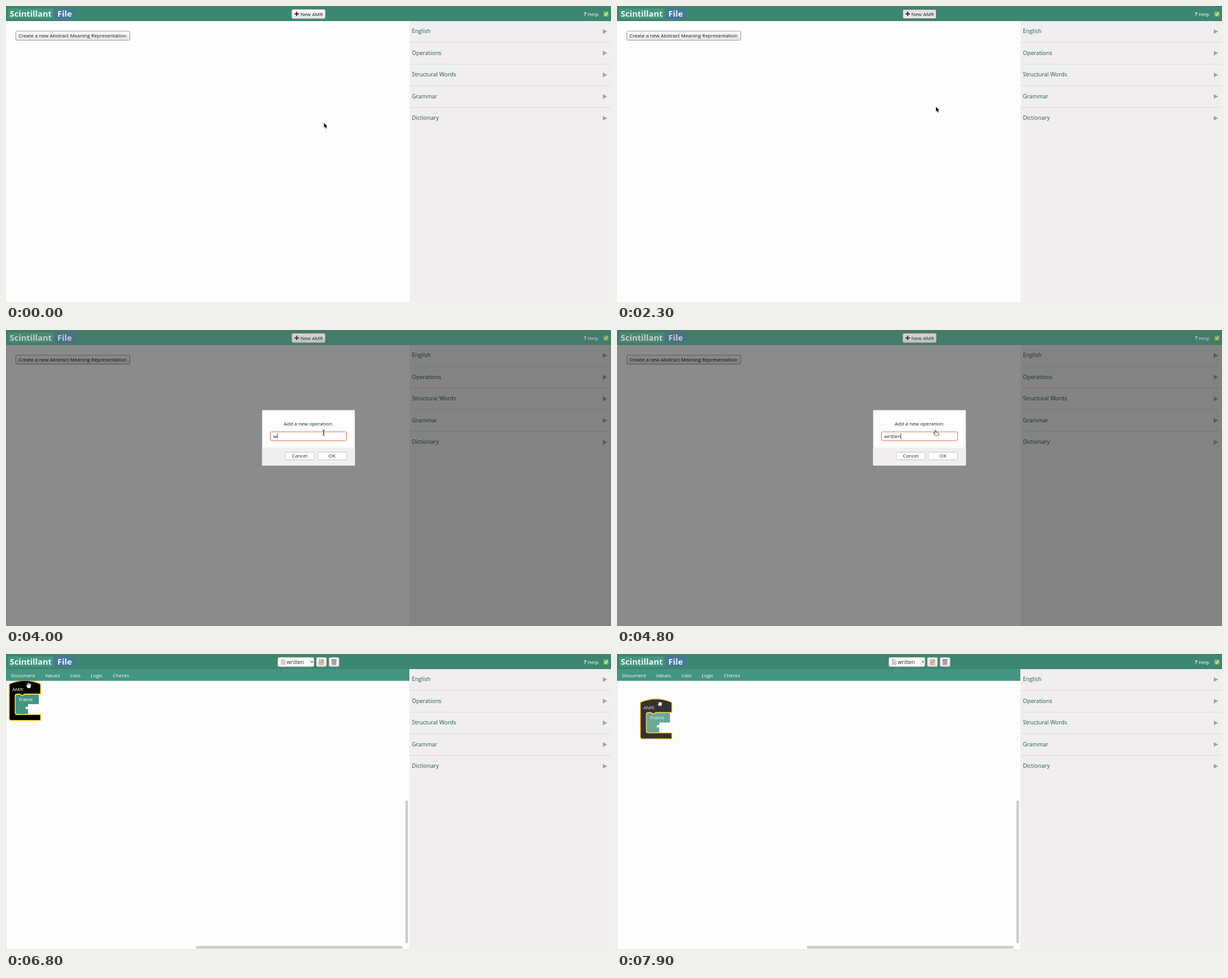
Recreate the animation shown at these times as an HTML page with a canvas. Size 960 px wide and 471 px high, loop 8 s.

```html
<!DOCTYPE html>
<html lang="en">
<head>
<meta charset="utf-8">
<title>Editor demo</title>
<style>
html, body { margin: 0; width: 100%; height: 100%; overflow: hidden; background: #fefdfe; }
canvas { display: block; width: 960px; height: 471px; }
</style>
</head>
<body>
<canvas id="stage"></canvas>
<script>
const W = 960, H = 471, LOOP = 8000, STEP = 100;
const FONT = '"Open Sans", "Noto Sans", sans-serif';
const PAGE = '#fefdfe', PANEL = '#f0eeef', HEAD = '#3d8671', MENU = '#449581';

const canvas = document.getElementById('stage');
const ctx = canvas.getContext('2d');
const ratio = window.devicePixelRatio || 1;
canvas.width = W * ratio;
canvas.height = H * ratio;

function rect(x, y, w, h, color) {
  ctx.fillStyle = color;
  ctx.fillRect(x, y, w, h);
}

function box(x, y, w, h, r, fill, stroke) {
  ctx.beginPath();
  ctx.roundRect(x, y, w, h, r);
  ctx.fillStyle = fill;
  ctx.fill();
  if (stroke) {
    ctx.strokeStyle = stroke;
    ctx.lineWidth = 1;
    ctx.stroke();
  }
}

// y is the middle of the capital letters
function label(text, x, y, size, color, weight = 400, align = 'left') {
  ctx.font = `${weight} ${size}px ${FONT}`;
  ctx.textAlign = align;
  ctx.fillStyle = color;
  ctx.fillText(text, x, y + size * 0.357);
}

function shape(d, fill, stroke, width = 1) {
  const path = new Path2D(d);
  if (fill) {
    ctx.fillStyle = fill;
    ctx.fill(path);
  }
  if (stroke) {
    ctx.strokeStyle = stroke;
    ctx.lineWidth = width;
    ctx.lineJoin = 'round';
    ctx.stroke(path);
  }
}

function at(x, y, draw) {
  ctx.save();
  ctx.translate(x, y);
  draw();
  ctx.restore();
}

// keys are [time, x, y], linear in between
function along(keys, t) {
  const i = keys.findIndex(k => k[0] > t);
  if (i === 0) return keys[0].slice(1);
  if (i < 0) return keys[keys.length - 1].slice(1);
  const [t0, x0, y0] = keys[i - 1], [t1, x1, y1] = keys[i];
  const p = (t - t0) / (t1 - t0);
  return [x0 + (x1 - x0) * p, y0 + (y1 - y0) * p];
}

const mousePath = [
  [0, 504.5, 186], [300, 505, 171], [600, 503, 119], [900, 499, 66],
  [1200, 493, 24], [1500, 488, 14], [1800, 486, 11], [1900, 486, 11],
  [2100, 497, 76], [2300, 506, 160.5], [5700, 505.5, 160.5],
  [6000, 440, 146], [6300, 262, 94], [6600, 117, 40], [6700, 61, 45], [6800, 36, 50]
];
const dragPath = [
  [6900, 0, 0], [7000, 1, 1], [7200, 10, 7], [7400, 24, 17],
  [7600, 36, 27], [7800, 34, 30.3], [7900, 32, 29.3]
];

function button(x, w, pressed) {
  const g = ctx.createLinearGradient(0, 5, 0, 20);
  g.addColorStop(0, pressed ? '#dedcde' : '#ffffff');
  g.addColorStop(1, pressed ? '#eeecee' : '#e7e5e7');
  box(x, 5.5, w, 14.5, 2, g, pressed ? '#777577' : '#b5b3b4');
}

function documentPicker() {
  box(431.5, 5.5, 57, 14.5, 2, '#ffffff', '#c8c6c7');
  rect(482, 6, 1, 13.5, '#e3e1e2');
  shape('M436.5 8.5h4.5l2.3 2.3v6.2h-6.8z', '#dcdadb', '#aaa8a9', 0.6);
  shape('M438 11h2.5M438 13h4M438 15h4', null, '#a3a1a2', 0.5);
  label('written', 445.5, 13, 8.1, '#222');
  shape('M483.7 11.8h3.6l-1.8 2.2z', '#222');

  button(492.5, 16);
  box(497, 8.8, 6.8, 8, 0.8, '#d6cdb2', '#a29b89');
  shape('M499 14.5l5-5', null, '#c78645', 1.3);

  button(512.5, 16);
  shape('M517 9.8h7l-.7 7.2h-5.6z', '#b8b6b8', '#777', 0.6);
  shape('M516.5 9h8', null, '#696869', 1.1);
  shape('M519 11v5M520.5 11v5M522 11v5', null, '#747374', 0.5);
}

function header(t) {
  rect(0, 0, W, 24, HEAD);
  box(3.5, 4, 72, 16, 1, '#47967f');
  box(76.5, 4, 32.5, 16, 1, '#45789a');
  label('Scintillant', 6, 12.2, 13.1, '#f0f6f3', 700);
  label('File', 81.5, 12.2, 13.1, '#f0f6f3', 700);

  if (t < 5500) {
    button(453.5, 53, t >= 1800 && t < 2400);
    shape('M457.8 12.6h7M461.3 9.1v7', null, '#222', 1.6);
    label('New AMR', 467, 12.8, 8, '#1c1c1c');
  } else {
    documentPicker();
  }

  label('?', 917, 13, 8.4, '#fff', 700);
  label('Help', 923, 13, 7.9, '#fff');
  box(948, 8.8, 8, 8, 1, '#85b750');
  shape('M949.8 12.8l1.7 1.9 3.2-4.2', null, '#fff', 1.2);
}

function sidebar(x) {
  rect(x, 24, W - x, H - 24, PANEL);
  ['English', 'Operations', 'Structural Words', 'Grammar', 'Dictionary'].forEach((name, i) => {
    const y = 40 + i * 34.5;
    label(name, 644, y, 9, '#27594b');
    shape(`M947 ${y - 3.2}l7 3.8-7 3.8z`, '#a6a4a6');
    if (i < 4) rect(x, y + 17.4, W - x, 1, '#dddbdd');
  });
}

function startPage() {
  const g = ctx.createLinearGradient(0, 40, 0, 54);
  g.addColorStop(0, '#fbfafb');
  g.addColorStop(1, '#e6e4e6');
  box(15.5, 40, 181, 14.5, 2, g, '#a9a7a9');
  label('Create a new Abstract Meaning Representation', 20, 47.2, 7.84, '#1c1c1c');
}

const OUTER = 'M0 0c15 -7.5 35 -7.5 50 0v16h-25.5l-3 2h-1.5l-3 -2h-4.5q-3 0 -3 3' +
  'v26.5q0 3 3 3h37.5v9.5h-47q-3 0 -3 -3z';
const INNER = 'M10 19q0 -2.3 2.5 -2.3h4.5l3 2h1.5l3 -2h22.5v15.3h-17v3.5' +
  'c0 3 -3.8 -2.2 -3.8 2.5s3.8 -.5 3.8 2.5v7.3h-5.5l-3 2h-1.5l-3 -2h-4.5q-2.5 0 -2.5 -2.3z';

function block(t) {
  const [dx, dy] = along(dragPath, t);
  at(5 + dx, 47.8 + dy, () => {
    ctx.globalAlpha = t >= 7000 ? 0.8 : 1;
    shape(OUTER, '#000');
    shape(INNER, MENU);
    shape(OUTER, null, '#fc3', 1.5);
    label('AMR:', 5, 8.5, 7.6, '#fff');
    label('Frame', 15.5, 24.2, 7.4, '#fff');
  });
}

function workspace(t) {
  ctx.save();
  ctx.beginPath();
  ctx.rect(0, 42.5, 640, H - 42.5);
  ctx.clip();
  block(t);
  ctx.restore();
  rect(0, 43, 0.6, H - 43, '#d2d0d2');
  rect(0, 470, 640, 0.6, '#d2d0d2');
  box(633.5, 233, 4.5, 227.5, 2.2, '#d0ced0');
  box(301, 464.5, 328.5, 4.5, 2.2, '#d0ced0');

  rect(0, 24, 640, 18.7, MENU);
  const items = { Document: 8, Values: 62, Lists: 102, Logic: 134.5, Checks: 169.5 };
  for (const name in items) label(name, items[name], 33.8, 7.8, '#fff');
}

function dialogButton(text, x, w) {
  box(x, 194.5, w, 12, 2, '#fdfcfd', '#cccacc');
  label(text, x + w / 2, 200.6, 8, '#333', 400, 'center');
}

function dialog(t) {
  rect(0, 0, W, 24, 'rgba(90,90,90,.25)');
  rect(0, 24, W, H - 24, 'rgba(0,0,0,.45)');

  rect(406.5, 127.5, 147, 88, '#fff');
  rect(406.5, 187, 147, 28.5, PANEL);
  label('Add a new operation:', 480, 149.5, 7.9, '#222', 400, 'center');
  dialogButton('Cancel', 443, 46);
  dialogButton('OK', 494, 46.5);

  box(419.5, 162, 121, 14, 2, '#fff', '#e27450');
  if (t < 4000) {
    rect(423.5, 164.2, 48, 9.8, '#e4541f');
    label('Untitled AMR', 424, 169.2, 7.8, '#fff');
    return;
  }
  // one letter each step, with a short pause after the fourth
  const count = t < 4500 ? Math.min(4, (t - 4000) / STEP + 1) : Math.min(7, (t - 4500) / STEP + 5);
  const typed = 'written'.slice(0, count);
  label(typed, 424, 169.2, 7.85, '#222');
  rect(424 + ctx.measureText(typed).width, 164.5, 0.7, 9, '#222');
}

const ARROW = 'M0 0v7.6l1.8-1.7 1.4 3 1.4-.6-1.4-2.9h2.4z';
const BEAM = 'M-2 -4.3q2 0 2 1.2v6.2q0 1.2 -2 1.2M2 -4.3q-2 0 -2 1.2v6.2q0 1.2 2 1.2';
const POINTER = 'M-1.5 -4q1 -.9 1.6 .3v2.7l3.2 .6q1.4 .4 1.2 1.8l-.6 3h-4.8' +
  'l-2.8 -3.4q-.2 -1.3 1 -.9l1.2 .9z';
const OPEN_HAND = 'M-1.7 4.6l-2.6 -4.2q.2 -1.3 1.5 -.3l.5 .4l-.9 -3.5q.7 -1.2 1.5 0l.5 1.5' +
  'l.1 -2.7q.8 -1 1.5 0l.3 2.5l.7 -2.1q1 -.8 1.4 .3l-.4 2.5l.7 -1.1q1.2 -.5 1.1 .7l-1.5 6z';
const FIST = 'M-1.6 3.6l-2.1 -3q.1 -1.2 1.4 -.6v-2.2q.7 -1 1.5 -.3q.8 -1 1.6 -.1' +
  'q.9 -.7 1.5 .3q1.2 -.5 1.4 .7l-.4 2.9l-.7 2.3z';

function cursor(t) {
  if (t >= 2400 && t < 4800) {
    at(504, 163.3, () => shape(BEAM, null, '#333', 0.8));
    return;
  }
  if (t >= 4800 && t < 5400) {
    at(506, 163.5, () => shape(POINTER, '#fff', '#333', 0.8));
    return;
  }
  let [x, y] = along(mousePath, t);
  if (t < 6800) {
    at(x, y, () => {
      shape(ARROW, null, '#fff', 1.3);
      shape(ARROW, '#111');
    });
    return;
  }
  const [dx, dy] = along(dragPath, t);
  at(x + dx, y + dy, () => shape(t < 7000 ? OPEN_HAND : FIST, '#fff', '#111', 0.6));
}

function render(t) {
  ctx.setTransform(ratio, 0, 0, ratio, 0, 0);
  rect(0, 0, W, H, PAGE);
  const editing = t >= 5400;
  sidebar(editing ? 640 : 640.5);
  if (editing) workspace(t);
  else startPage();
  header(t);
  if (t >= 2400 && t < 5400) dialog(t);
  cursor(t);
}

const start = performance.now();
function tick(now) {
  const time = Math.max(0, now - start) % LOOP;
  render(Math.floor(time / STEP) * STEP);
  requestAnimationFrame(tick);
}
render(0);
requestAnimationFrame(tick);
</script>
</body>
</html>
```
